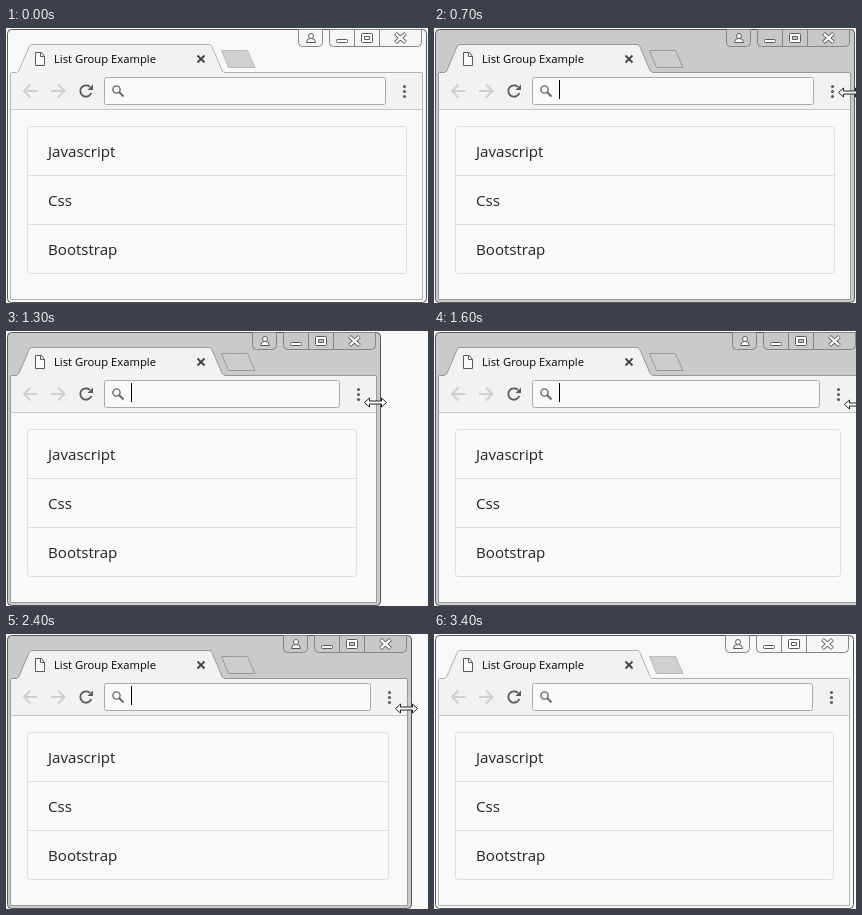
An HTML page with a canvas for the animation above (3.5 s loop, 422 px wide and 275 px high).

```html
<!DOCTYPE html>
<html lang="en">
<head>
<meta charset="utf-8">
<title>Resizing window</title>
<style>
html, body { margin: 0; height: 100%; overflow: hidden; background: #f9f9f9; }
canvas { display: block; }
</style>
</head>
<body>
<canvas id="stage" width="422" height="275"></canvas>
<script>
const c = document.getElementById('stage').getContext('2d');
const LOOP = 3500, STEP = 100;
const FONT = 'px "Open Sans", "Noto Sans", sans-serif';
const PAGE = '#f9f9f9', BAR = '#f2f2f2', DARK = '#5a5a5a';

// Turning points of the drag: time, window right edge, pointer height
const drag = [
  [200, 421, 74], [300, 421, 64], [700, 421, 64], [1100, 352, 69], [1200, 356, 70],
  [1580, 427, 73], [1800, 427, 73], [2200, 375, 74], [2400, 406, 74], [2680, 420, 74]
];

function dragAt(t) {
  const i = drag.findIndex(key => key[0] > t);
  if (i < 1) return drag.at(i);
  const a = drag[i - 1], b = drag[i];
  const k = (t - a[0]) / (b[0] - a[0]);
  return a.map((v, j) => Math.round(v + (b[j] - v) * k));
}

function paint(fill, stroke, width = 1) {
  if (fill) { c.fillStyle = fill; c.fill(); }
  if (stroke) { c.strokeStyle = stroke; c.lineWidth = width; c.stroke(); }
}

function poly(points, fill, stroke, width, open) {
  c.beginPath();
  for (let i = 0; i < points.length; i += 2) c.lineTo(points[i], points[i + 1]);
  if (!open) c.closePath();
  paint(fill, stroke, width);
}

const line = (points, color, width) => poly(points, null, color, width, true);

function rect(x, y, right, bottom, color) {
  c.fillStyle = color;
  c.fillRect(x, y, right - x, bottom - y);
}

function box(x, y, right, bottom, radius, fill, stroke) {
  c.beginPath();
  c.roundRect(x, y, right - x, bottom - y, radius);
  paint(fill, stroke);
}

function circle(x, y, r, fill, stroke, width) {
  c.beginPath();
  c.arc(x, y, r, 0, 7);
  paint(fill, stroke, width);
}

function cross(x, y, rx, ry, color, width) {
  for (const s of [1, -1]) line([x - rx, y - ry * s, x + rx, y + ry * s], color, width);
}

function text(str, x, y, size, color) {
  c.font = size + FONT;
  c.fillStyle = color;
  c.fillText(str, x, y);
}

function controls(w, active) {
  const edge = '#858585', fill = active ? '#c8c8c8' : '#f6f6f6';
  box(w - 128.5, 1.5, w - 104.5, 18.5, [0, 0, 4, 4], fill, edge);
  box(w - 97.5, 1.5, w - 5.5, 18.5, [0, 0, 4, 4], fill, edge);
  for (const x of [72.5, 47.5]) line([w - x, 1, w - x, 18], edge);

  box(w - 120.5, 10.5, w - 111.5, 14.5, [4, 4, 0, 0], '#fff', DARK);
  circle(w - 116, 8, 2.5, '#fff', DARK);
  box(w - 90.5, 11.5, w - 79.5, 14.5, 1, '#fff', DARK);
  box(w - 65.5, 5.5, w - 54.5, 14.5, 1, '#fff', DARK);
  box(w - 62.5, 8.5, w - 57.5, 11.5, 0, fill, DARK);
  cross(w - 26.5, 10, 5, 4.5, DARK, 4);
  cross(w - 26.5, 10, 4.6, 4.1, '#fff', 2.2);
}

function tabs(w, active) {
  const edge = active ? '#979797' : '#b2b2b2';
  line([5, 44.5, w - 5, 44.5], edge);
  c.beginPath();
  c.moveTo(8, 44.5);
  c.arcTo(12, 44.5, 24, 16.5, 3);
  c.arcTo(24, 16.5, 205, 16.5, 3);
  c.arcTo(205, 16.5, 217, 44.5, 3);
  c.arcTo(217, 44.5, 221, 44.5, 3);
  c.lineTo(221, 44.5);
  paint(BAR, edge);
  rect(11, 44, 218, 46, BAR);

  c.lineJoin = 'round';
  poly([215.5, 22.5, 241.5, 22.5, 249, 39.5, 222.5, 39.5],
    active ? '#cdcdcd' : '#d0d0d0', active ? '#999' : '#bbb');
  c.lineJoin = 'miter';

  poly([29.5, 24.5, 35.5, 24.5, 38.5, 28.5, 38.5, 37.5, 29.5, 37.5], '#fafafa', DARK);
  line([34.5, 24.5, 34.5, 28.5, 38.5, 28.5], DARK);
  text('List Group Example', 48, 35, 11.25, '#000');
  cross(195, 31, 3.5, 3.5, '#444', 1.8);
}

function toolbar(w, caret) {
  rect(5, 45, w - 5, 81, BAR);
  line([5, 81.5, w - 5, 81.5], '#c6c6c6');
  for (const [x, dir] of [[24.5, -1], [52, 1]]) {
    line([x - 7 * dir, 63, x + 6 * dir, 63], '#d0d0d0', 2);
    line([x, 56.5, x + 6.5 * dir, 63, x, 69.5], '#d0d0d0', 2);
  }

  c.beginPath();
  c.arc(80, 63, 5.7, 0.35, 5.5);
  paint(null, DARK, 1.8);
  poly([87, 56.5, 87, 62, 81.5, 62], DARK);

  box(98.5, 49.5, w - 41.5, 76.5, 2, '#fafafa', '#aaa');
  circle(110.5, 61.5, 3.6, null, '#666', 1.4);
  line([113, 64, 117.5, 68.5], '#666', 1.8);
  if (caret) rect(125, 52, 126, 71, '#000');
  for (const y of [58, 63, 68]) circle(w - 22.5, y + 0.5, 1.6, '#606060');
}

function list(right) {
  box(21.5, 98.5, right - 0.5, 245.5, 3, PAGE, '#dfdfdf');
  ['Javascript', 'Css', 'Bootstrap'].forEach((item, i) => {
    const y = 98.5 + 49 * i;
    if (i) line([22, y, right - 1, y], '#dfdfdf');
    text(item, 42, y + 30.5, 15.1, '#222');
  });
}

function pointer(x, y) {
  const half = d => [[6, -1.5], [6, -4.5], [11, 0], [6, 4.5], [6, 1.5]]
    .flatMap(p => [x + p[0] * d, y + p[1] * d]);
  poly([...half(1), ...half(-1)], '#fff', '#222');
}

function draw(time) {
  const t = Math.floor(time / STEP) * STEP;
  const [, w, y] = dragAt(t);
  const pageW = Math.min(w, dragAt(t - 20)[1]); // layout trails a growing window
  const active = t >= 700 && t < 3400;

  rect(0, 0, 422, 275, PAGE);
  box(1.5, 1.5, w - 0.5, 274.5, 4, active ? '#cacaca' : '#f8f8f8', '#555');
  rect(5, 45, w - 5, 271, PAGE);
  line([4.5, 45, 4.5, 271.5, w - 4.5, 271.5, w - 4.5, 45], active ? '#999' : '#b5b5b5');
  controls(w, active);
  tabs(w, active);
  toolbar(w, t >= 700 && t < 3200);
  list(pageW - 20);
  if (t >= 200 && t < 3000) pointer(w - 5.5, y + 0.5);
}

const begin = performance.now();
function tick() {
  draw((performance.now() - begin) % LOOP);
  requestAnimationFrame(tick);
}
tick();
</script>
</body>
</html>
```
